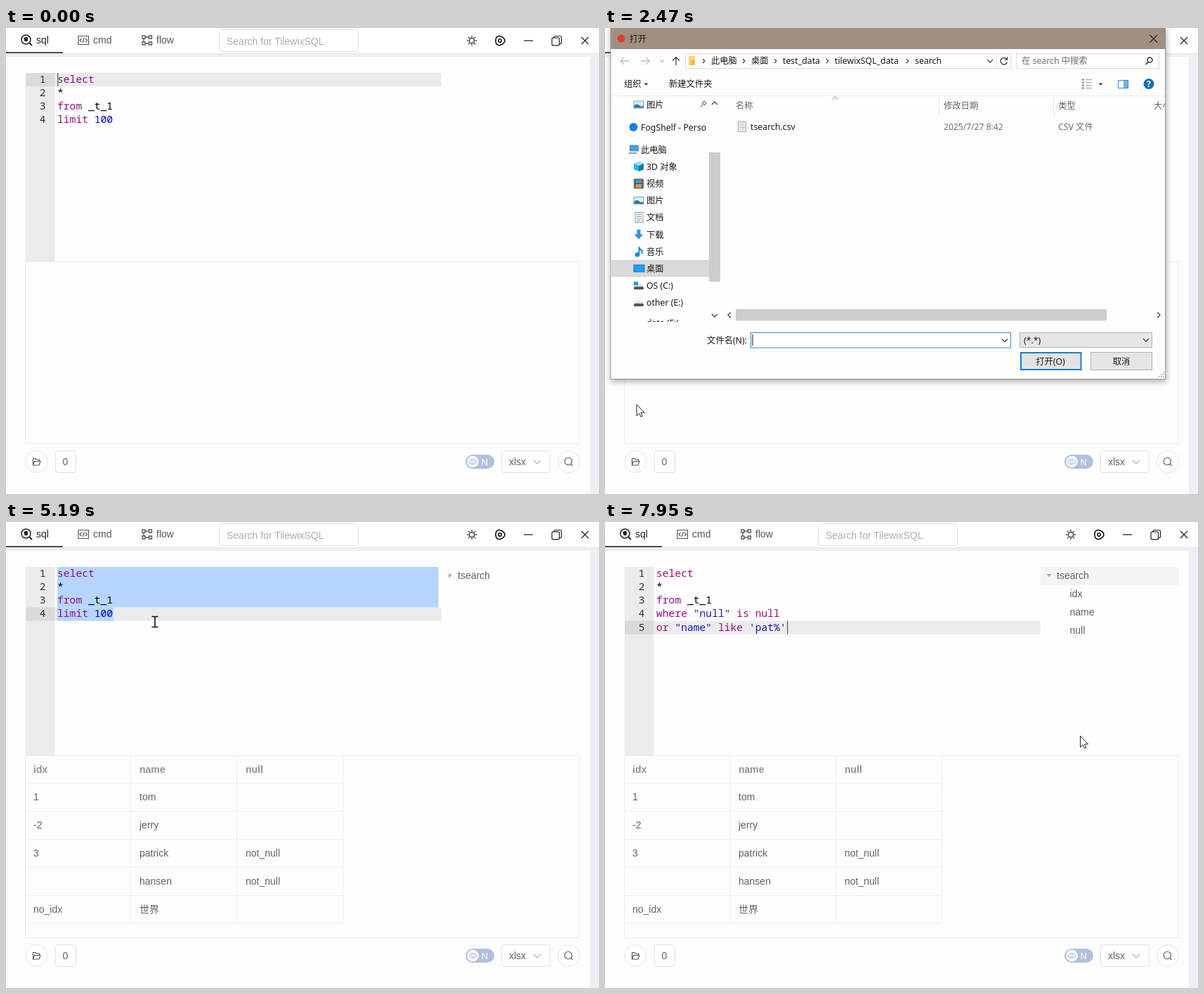
These frames come from a looping animation (844x663 px, 8000 ms). An HTML page:

```html
<!DOCTYPE html>
<html lang="en">
<head>
<meta charset="utf-8">
<title>SQL editor demo</title>
<style>
html, body { margin: 0; width: 100%; height: 100%; overflow: hidden; background: #fdfdfd; }
svg { display: block; }
text { white-space: pre; }
.ui { font: 14px "Liberation Sans", "Noto Sans CJK SC", sans-serif; }
.code { font: 14.67px "Noto Sans Mono", monospace; }
.win { font: 12.3px "Noto Sans", "Noto Sans CJK SC", sans-serif; }
.k { fill: #930f80; } .n { fill: #0000cd; } .s { fill: #1a1aa6; }
</style>
</head>
<body>
<svg id="stage" width="844" height="663" viewBox="0 0 844 663" xmlns="http://www.w3.org/2000/svg"></svg>
<script>
const LOOP = 8000, ROW = 19.15;

// markup helpers
const text = (x, y, s, fill = '#606266', more = '') => `<text x="${x}" y="${y}" fill="${fill}" ${more}>${s}</text>`;
const rect = (x, y, w, h, fill, more = '') => `<rect x="${x}" y="${y}" width="${w}" height="${h}" fill="${fill}" ${more}/>`;
const line = (d, stroke = '#333', w = 1.2, more = '') => `<path d="${d}" fill="none" stroke="${stroke}" stroke-width="${w}" ${more}/>`;
const disc = (x, y, r, fill, more = '') => `<circle cx="${x}" cy="${y}" r="${r}" fill="${fill}" ${more}/>`;
const box = (x, y, w, h, stroke, fill = '#fff', r = 0) => rect(x + .5, y + .5, w - 1, h - 1, fill, `stroke="${stroke}" rx="${r}"`);
const chevron = (x, y, dir = 0, size = 4, color = '#444', w = 1.3) =>
  line(`M${-size} ${-size / 2}L0 ${size / 2} ${size} ${-size / 2}`, color, w, `transform="translate(${x} ${y}) rotate(${dir})"`);
const group = (id, body, more = '') => `<g id="${id}" ${more}>${body}</g>`;

function header() {
  let rays = '', gear = '';
  for (let i = 0; i < 8; i++) rays += `<path d="M663 11V13.2" transform="rotate(${i * 45} 663 18)" stroke="#222" stroke-width="1.3"/>`;
  for (let i = 0; i < 12; i++) {
    const a = (i * 30 - 15) * Math.PI / 180, r = i % 4 > 1 ? 6.2 : 6.9;
    gear += (i ? 'L' : 'M') + (703 + r * Math.cos(a)).toFixed(1) + ' ' + (18 + r * Math.sin(a)).toFixed(1);
  }
  return rect(0, 0, 844, 37, '#fff') + rect(0, 36, 844, 5, '#eeeff4') + rect(0, 36, 844, 1, '#e3e4e8') +
    rect(831, 37, 13, 626, '#eeeff4') + rect(0, 34, 81, 2, '#505050') +
    disc(28.5, 16.5, 6.5, 'none', 'stroke="#222" stroke-width="1.5"') + line('M33 21L37 25', '#222', 1.8) +
    disc(28.5, 16.5, 2.7, '#222') + line('M25.5 15Q28 12.3 31 14', '#222', 1.2) + text(43, 22, 'sql', '#222') +
    line('M103 11.5H117.5V23.5H103ZM107.5 15L105 17.5 107.5 20M113 15L115.5 17.5 113 20M111.3 14L109.3 21', '#555', 1.2) +
    text(124, 22, 'cmd', '#555') +
    line('M194 11H198V15H194ZM203.5 11H207.5V15H203.5ZM194 20H198V24H194ZM203.5 20H207.5V24H203.5ZM198 13H203.5M198 22H203.5M196 15V20', '#555', 1.3) +
    text(214, 22, 'flow', '#555') +
    box(303, 2, 199, 32, '#dcdfe6', '#fff', 4) + text(314, 23.5, 'Search for TilewixSQL', '#a8abb2') +
    disc(663, 18, 3.6, 'none', 'stroke="#222" stroke-width="1.3"') + rays +
    line(gear + 'Z', '#111', 1.6) + disc(703, 18, 2.2, 'none', 'stroke="#111" stroke-width="1.5"') +
    line('M737 18H750', '#222', 1.3) +
    line('M780 14V13.5Q780 11.5 782 11.5H788.5Q790.5 11.5 790.5 13.5V20.5Q790.5 22.5 788.5 22.5H787.5', '#222') +
    rect(777, 13.8, 10.5, 11, 'none', 'rx="2" stroke="#222" stroke-width="1.2"') +
    line('M819 13L829 23M829 13L819 23', '#222', 1.3);
}

function footer() {
  return disc(43.5, 617, 15.5, '#fff', 'stroke="#dfe1e6"') +
    line('M38.5 622V612.5H42L43.5 614H47.5V616.5M38.5 622L40.5 616.5H49L47 622Z', '#555', 1.1) +
    box(70, 601, 30, 32, '#dcdfe6', '#fff', 4) + text(84.5, 622, '0', '#606266', 'text-anchor="middle"') +
    rect(654, 607, 41, 20, '#b0c0dd', 'rx="10"') + disc(664.5, 617, 8.3, '#fff') +
    line('M658.5 617Q664.5 609.5 670.5 617Q664.5 624.5 658.5 617Z', '#b0c0dd', 1.1) + disc(664.5, 617, 2, 'none', 'stroke="#b0c0dd"') +
    text(676.5, 621.5, 'N', '#fff', 'font-size="13"') +
    box(705, 601, 70, 32, '#dcdfe6', '#fff', 4) + text(716, 622, 'xlsx') + chevron(756, 617.5, 0, 5, '#a8abb2', 1.1) +
    disc(801, 617, 15.5, '#fff', 'stroke="#dfe1e6"') + disc(800.3, 616.5, 5.2, 'none', 'stroke="#555" stroke-width="1.1"') + line('M804 620.5L806.5 623', '#555', 1.1);
}

const span = ([cls, s]) => `<tspan class="${cls}">${s}</tspan>`;
const HEAD = [[['k', 'select']], [['', '*']], [['k', 'from'], ['', ' _t_1']]];
const FIRST = [...HEAD, [['k', 'limit'], ['n', ' 100']]];
const SECOND = [...HEAD, [['k', 'where'], ['s', ' "null"'], ['k', ' is null']],
  [['k', 'or'], ['s', ' "name"'], ['k', ' like'], ['s', " 'pat%'"]]];
const code = rows => rows.map((r, i) => text(73, 78 + i * ROW, r.map(span).join(''), '#000') +
  text(56.5, 78 + i * ROW, i + 1, '#333', 'text-anchor="end"')).join('');

function editor() {
  return rect(28, 64, 41.5, 268, '#ebebeb') +
    group('active', rect(28, 64, 41.5, ROW, '#dadada') + rect(69.5, 64, 550, ROW, '#ebebeb')) +
    group('selection', rect(73, 64, 542.5, ROW * 3, '#b5d5ff') + rect(73, 64 + ROW * 3, 80, ROW, '#b5d5ff')) +
    group('first', code(FIRST)) + group('second', code(SECOND)) + rect(0, 64, 1.5, ROW, '#777', 'id="caret"');
}

function table() {
  const rows = [['idx', 'name', 'null'], ['1', 'tom', ''], ['-2', 'jerry', ''], ['3', 'patrick', 'not_null'],
    ['', 'hansen', 'not_null'], ['no_idx', '世界', '']];
  let out = '', grid = 'M177.5 332V571M328.5 332V571M479.5 332V571';
  rows.forEach((cells, i) => {
    grid += `M28 ${Math.round(371 + i * 39.9) + .5}H479.5`;
    cells.forEach((s, c) => out += text(39 + c * 151, 356.5 + i * 39.85, s, i ? '#606266' : '#909399', i ? '' : 'font-weight="bold"'));
  });
  return line(grid, '#ebeef5', 1) + out;
}

function tree() {
  return rect(619.5, 64, 197.5, 26, '#f2f5f8', 'id="treeHover"') +
    '<path id="twist" d="M-2 -3.5L2.5 0 -2 3.5Z" fill="#a8abb2"/>' + text(643, 81, 'tsearch') +
    `<clipPath id="fold">${rect(620, 90, 197, 78, '#000', 'id="foldBox"')}</clipPath>` +
    group('kids', ['idx', 'name', 'null'].map((s, i) => text(661.5, 107 + i * 26.2, s)).join(''), 'clip-path="url(#fold)"');
}

// small sidebar pictograms, drawn around 0,0
const screen = rect(-7, -5, 15, 10, '#1e9fef', 'stroke="#1778bb"');
const photo = rect(-7, -5, 14, 10, '#d9ecf8', 'stroke="#8aa0ae"') + '<path d="M-6.5 4.5V1Q-2 -2 1 1T6.5 1V4.5Z" fill="#35759f"/>';
const drive = '<path d="M-7 2L-3 -1H7L5 2Z" fill="#ddd"/>' + rect(-7, 2, 14, 4, '#555', 'rx="1.5"');
const ICONS = {
  photo, screen,
  cloud: disc(0, 0, 6, '#1683d8'),
  pc: rect(-5, -6, 12, 8, '#38a5e8', 'stroke="#6b8ba0"') + rect(-7, 4, 12, 2, '#8fa4b0'),
  cube: '<path d="M0 -7L7 -4V4L0 7 -7 4V-4Z" fill="#29b6dc"/><path d="M0 -1L7 -4V4L0 7Z" fill="#1478a8"/><path d="M0 -7L7 -4 0 -1 -7 -4Z" fill="#8ce3f5"/>',
  film: rect(-7, -7, 14, 14, '#3b4450') + rect(-4, -6, 8, 5.5, '#4f8fd0') + rect(-4, .5, 8, 5.5, '#c3a050') +
    line('M-5.5 -6V7M5.5 -6V7', '#ccc', 1.5, 'stroke-dasharray="1.5 1.5"'),
  doc: rect(-5, -7, 11, 14, '#fafafa', 'stroke="#8b9aa8"') + line('M-3 -4H4M-3 -1H4M-3 2H4M-3 4.5H2', '#6f9cc0', 1),
  down: '<path d="M-2.5 -7H2.5V-.5H6.5L0 6.5 -6.5 -.5H-2.5Z" fill="#348fe0"/>',
  note: disc(-2, 4.5, 3.2, '#1583d6') + line('M.5 4.5V-6.5Q1 -3 5 -1Q5.500 1 4 3', '#1583d6', 1.8),
  system: drive + rect(-7, -5, 6, 5, '#1a9be0'), drive
};

function sidebar() {
  const items = [['photo', 109, '图片'], ['cloud', 141, 'FogShelf - Perso', 1], ['pc', 173, '此电脑', 1], ['cube', 197, '3D 对象'],
    ['film', 221.5, '视频'], ['photo', 245.5, '图片'], ['doc', 269.5, '文档'], ['down', 294, '下载'], ['note', 318, '音乐'],
    ['screen', 342, '桌面'], ['system', 366, 'OS (C:)'], ['drive', 390, 'other (E:)'], ['drive', 419, 'data (F:)']];
  return `<clipPath id="side">${rect(8, 98, 140, 320, '#000')}</clipPath><g clip-path="url(#side)">` +
    rect(9, 162, 139, 24, '#e5f3ff', 'id="sideHover"') + rect(8.5, 330, 139.5, 24, '#d9d9d9') +
    items.map(([icon, y, s, outer]) => `<g transform="translate(${outer ? 40.5 : 48} ${y})">${ICONS[icon]}</g>` +
      text(outer ? 51 : 59, y + 4.5, s, '#1a1a1a')).join('') + '</g>' +
    line('M136 112L139 109M138 106L142 110M139 106L141 104 144 107 142 109', '#7d8790', 1.5) +
    rect(148, 177, 16, 184, '#cdcdcd') + chevron(156, 107, 180) + chevron(156, 409);
}

function dialog() {
  const gray = '#6d6d6d', ink = '#1a1a1a';
  const crumbs = [[151, '此电脑'], [208, '桌面'], [253, 'test_data'], [327, 'tilewixSQL_data'], [441, 'search']];
  let grip = '';
  for (let i = 0; i < 3; i++) for (let j = 0; j <= i; j++) grip += rect(794 - j * 3, 489 + i * 3, 1.6, 1.6, '#aaa');
  return rect(8, 0, 789.5, 499.5, '#fdfdfd', 'stroke="#999" filter="url(#shadow)"') +
    rect(8, 0, 789.5, 30, '#a08f82') + disc(23, 15, 5.5, '#df3d2c') + text(35, 19.5, '打开', ink, 'font-size="12"') +
    line('M775.5 10L786 20.500M786 10L775.500 20.500', '#222', 1.1) +
    line('M34 47H22M27 42L22 47 27 52M51 47H63M58 42L63 47 58 52', '#bcbcbc', 1.3) + chevron(81, 47, 0, 2.5, '#bbb') +
    line('M101 53V41.500M96 46.500L101 41.500 106 46.500', '#444', 1.3) +
    box(114, 36, 464, 22, '#d9d9d9') + line('M557.5 37V57', '#e0e0e0', 1) +
    rect(119, 40, 9, 13, '#fbd574') + rect(122, 46, 6, 7, '#f0b93c') +
    crumbs.map(([x, s]) => chevron(x - 10.5, 47, -90, 3, '#444') + text(x, 51, s, ink)).join('') + chevron(548, 47) +
    line('M571.500 44A4.800 4.800 0 1 0 572.500 48.500M572.500 41V45H568.500', '#444', 1.4) +
    box(585, 36, 204, 22, '#d9d9d9') + text(593, 51, '在 search 中搜索', gray) +
    disc(775.5, 45.5, 3.5, 'none', 'stroke="#333" stroke-width="1.5"') + line('M773 48.500L769.500 52', '#333', 1.7) +
    text(27, 84, '组织', ink) + text(91, 84, '新建文件夹', ink) +
    '<path d="M55.500 78.500H61.500L58.500 81.500ZM702.500 78.500H708.500L705.500 81.500Z" fill="#333"/>' +
    line('M678.500 73.500H682M678.500 77.500H682M678.500 81.500H682M678.500 85.500H682', '#7a8fa0', 2) +
    line('M684 73.500H693M684 77.500H693M684 81.500H693M684 85.500H693', '#999', 1) +
    box(730, 74, 15, 12, '#3c88bd') + rect(738, 75, 6, 10, '#70b5e8') +
    disc(774, 79.5, 7.5, '#0b6fc2') + text(774, 84, '?', '#fff', 'text-anchor="middle" font-weight="bold"') +
    line('M8 96.500H797', '#ececec', 1) + sidebar() +
    text(186, 115, '名称', '#5f6670') + text(482, 115, '修改日期', '#5f6670') + text(645, 115, '类型', '#5f6670') +
    `<clipPath id="list">${rect(170, 97, 627, 60, '#000')}</clipPath><g clip-path="url(#list)">${text(781, 115, '大小', '#5f6670')}</g>` +
    chevron(327.5, 99.5, 180, 4, '#888', 1) + line('M475.500 98V124M638.500 98V124', '#e5e5e5', 1) +
    rect(183, 129, 614, 22.5, '#e5f3ff', 'id="fileRow"') +
    box(189, 133, 12, 15, '#a0a0a0', '#f7f7f7') + line('M191 136.500H199M191 139H199M191 141.500H199M191 144H199', '#b5b5b5', 1) +
    text(207, 144.5, 'tsearch.csv', ink) + text(482, 144.5, '2025/7/27 8:42', gray, 'font-size="12.1"') + text(645, 144.5, 'CSV 文件', gray) +
    rect(186, 400, 528, 16.5, '#cdcdcd') + chevron(177, 408.5, 90) + chevron(788, 408.5, -90) +
    text(202, 448.5, '文件名(N):', ink, 'text-anchor="end"') + box(207, 433, 371, 22.5, '#3a8acb') + chevron(569, 444.5) +
    rect(209.5, 436, 1, 16, '#111', 'id="fieldCaret"') +
    box(590, 433, 189, 22, '#b4b4b4', '#e5e5e5') + text(596, 448.5, '(*.*)', ink) + chevron(770, 444) +
    rect(592, 462, 85.5, 24, '#e3e3e3', 'stroke="#1a7ccb" stroke-width="2"') + text(634, 478.5, '打开(O)', ink, 'text-anchor="middle"') +
    box(691, 461, 88, 26, '#b4b4b4', '#e5e5e5') + text(735, 478.5, '取消', ink, 'text-anchor="middle"') + grip;
}

const tip = '<path d="M12 558.500H74Q77.500 558.500 77.500 562V585Q77.500 588.500 74 588.500H47L43 592.500 39 588.500H12Q8.500 588.500 8.500 585V562Q8.500 558.500 12 558.500Z" fill="#fff" stroke="#e4e7ed"/>' +
  text(43, 577.5, 'open file', '#222', 'text-anchor="middle" font-size="12"');

const $ = id => document.getElementById(id);
$('stage').innerHTML =
  '<filter id="shadow" x="-5%" y="-5%" width="110%" height="112%"><feDropShadow dx="1" dy="3" stdDeviation="4" flood-opacity=".33"/></filter>' +
  rect(0, 0, 844, 663, '#fdfdfd') + group('page', header() + footer() + box(27, 332, 790, 260, '#e8eaef', 'none'), 'class="ui"') +
  group('code', editor(), 'class="code"') + group('result', table() + tree(), 'class="ui"') +
  group('tip', tip, 'class="ui"') + group('dialog', dialog(), 'class="win"') +
  group('arrow', '<path d="M.5 .5V16.500L4.200 13 6.500 18 8.800 17 6.500 12H11.500Z" fill="#fff" stroke="#222"/>') +
  group('beam', line('M-4.500 -7.500H-1L0 -6.500 1 -7.500H4.500M-4.500 7.500H-1L0 6.500 1 7.500H4.500M0 -7V7', '#111', 1.6));

// pointer stops: time, x, y
const PATH = [[410, 128, 664], [1200, 40, 653], [1600, 38, 629], [2000, 35, 619], [2290, 35, 619], [2850, 130, 166],
  [2990, 279, 131], [3500, 279, 131], [3830, 236, 144], [4260, 236, 144], [4440, 212, 142], [5850, 212, 142],
  [6200, 350, 250], [6690, 533, 487], [6730, 533, 487], [7060, 659, 155], [7210, 655, 77], [7630, 655, 77], [7950, 676, 304]];
const still = (a, b) => !a || !b || (a[1] === b[1] && a[2] === b[2]);

function slope(i, c) {
  const [a, p, b] = [PATH[i - 1], PATH[i], PATH[i + 1]];
  return still(a, p) || still(p, b) ? 0 : (b[c] - a[c]) / (b[0] - a[0]);
}

function pointer(t) {
  let i = 0;
  while (i < PATH.length - 2 && t >= PATH[i + 1][0]) i++;
  const a = PATH[i], b = PATH[i + 1], d = b[0] - a[0], u = clamp((t - a[0]) / d), v = 1 - u;
  return [1, 2].map(c => v * v * (1 + 2 * u) * a[c] + u * u * (3 - 2 * u) * b[c] +
    d * u * v * (v * slope(i, c) - u * slope(i + 1, c)));
}

const clamp = v => Math.max(0, Math.min(1, v));
const ramp = (t, start, len) => clamp((t - start) / len);
const show = (id, on) => $(id).setAttribute('visibility', on ? 'visible' : 'hidden');
const set = (id, name, v) => $(id).setAttribute(name, v);
const within = (t, a, b) => t >= a && t < b;

function draw(t) {
  const [x, y] = pointer(t);
  const row = t < 4580 ? 0 : t < 5380 ? 3 : 4;
  const pasted = t >= 5380;
  set('active', 'transform', `translate(0 ${row * ROW})`);
  show('selection', within(t, 4860, 5380));
  show('first', !pasted);
  show('second', pasted);
  set('caret', 'x', [73, 0, 0, 153, 259][row]);
  set('caret', 'y', 64 + row * ROW);
  show('caret', t < 5190 || (pasted && Math.floor((t - 5390 + 10) / 505) % 2 === 0) || t >= 7390);

  const open = ramp(t, 2160, 250), shut = ramp(t, 3450, 200);
  const scale = 1 - .1 * (1 - open) ** 3 - .1 * shut * shut;
  const alpha = (1 - (1 - open) ** 2) * (1 - shut);
  show('dialog', alpha > 0);
  set('dialog', 'opacity', alpha);
  set('dialog', 'transform', `translate(402.5 250) scale(${scale}) translate(-402.5 -250)`);
  const live = alpha > 0;
  show('sideHover', live && x < 148 && within(y, 162, 186));
  show('fileRow', live && x > 183 && within(y, 129, 152));
  set('fileRow', 'fill', t < 3410 ? '#e5f3ff' : '#cce8ff');
  show('fieldCaret', live && (t < 2740 || t >= 3270));
  set('tip', 'opacity', ramp(t, 1650, 150) * (1 - ramp(t, 2330, 120)));

  show('result', t >= 3700);
  const fold = ramp(t, 7630, 280), ease = fold * fold * (3 - 2 * fold);
  set('treeHover', 'opacity', t >= 7150 ? 1 : 0);
  set('twist', 'transform', `translate(632 76) rotate(${90 * ease})`);
  set('foldBox', 'height', 78 * ease);

  const typing = !live && t > 3600 && x > 69 && x < 619 && y > 64 && y < 332;
  show('beam', typing);
  show('arrow', t >= 410 && !typing);
  set(typing ? 'beam' : 'arrow', 'transform', `translate(${x.toFixed(2)} ${y.toFixed(2)})`);
}

const start = performance.now();
function tick() {
  draw((performance.now() - start) % LOOP);
  requestAnimationFrame(tick);
}
draw(0);
requestAnimationFrame(tick);
</script>
</body>
</html>
```
